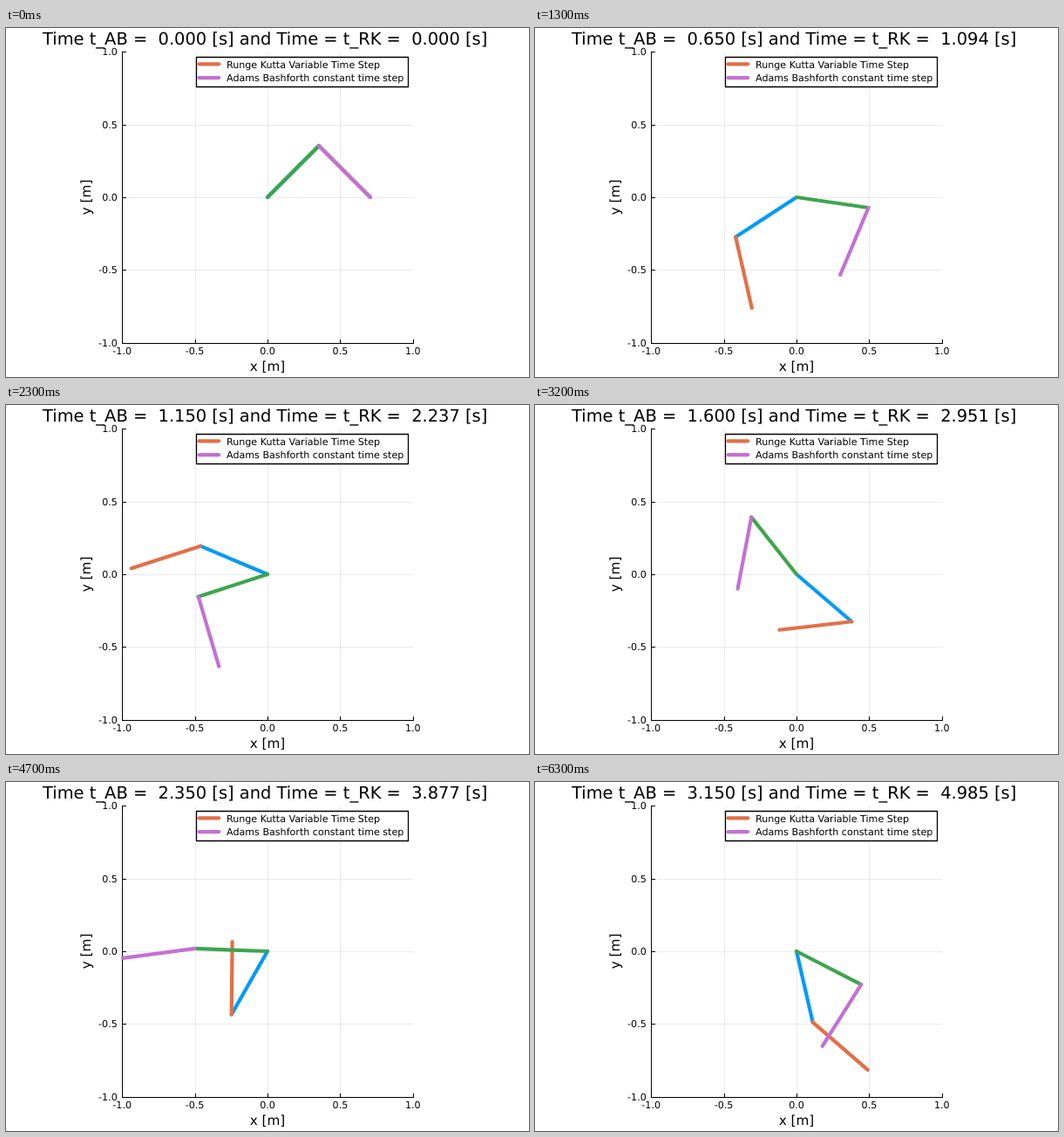
An HTML page for the animation above (6.4 s loop, 600x400 px).

```html
<!DOCTYPE html>
<html lang="en">
<head>
<meta charset="utf-8">
<title>Double pendulum</title>
<style>
  html, body { margin: 0; width: 100%; height: 100%; overflow: hidden; background: #fff; }
  svg { display: block; width: 600px; height: 400px; }
  text { font: 11.11px "DejaVu Sans", sans-serif; white-space: pre; text-rendering: geometricPrecision; }
  path, line { fill: none; stroke-linecap: round; }
  #title { font-size: 19.44px; }
  .label { font-size: 15.28px; text-anchor: middle; }
  .grid { stroke: #000; stroke-opacity: .08; stroke-linecap: butt; }
  .axis { stroke: #000; stroke-linecap: square; }
  .rod { stroke-width: 4.2; }
</style>
</head>
<body>
<svg viewBox="0 0 600 400">
  <g id="plot"></g>
  <text class="label" x="300" y="392.6">x [m]</text>
  <text class="label" transform="translate(97 194) rotate(-90)">y [m]</text>
  <text id="title" x="42" y="19.2"></text>
  <g id="rods"></g>
  <rect x="218.5" y="33.5" width="243" height="34" fill="#fff" stroke="#000" stroke-width="1.3" stroke-linejoin="round"/>
  <path class="rod" d="M221.5 41.3H244.2" stroke="#e36f47"/>
  <path class="rod" d="M221.5 57.1H244.2" stroke="#c371d2"/>
  <text x="253" y="45.5">Runge Kutta Variable Time Step</text>
  <text x="253" y="61.1">Adams Bashforth constant time step</text>
</svg>
<script>
const STEP = 100, COUNT = 64;
const CX = 300, CY = 194, UNIT = 166.8, LEN = UNIT / 2;

// key poses of the swing: time, upper and lower angle in degrees from straight down
const SWING = [
  [0, 135, 45], [.65, 81.7, -22.8], [1.094, -56.9, 12.9], [1.15, -72.1, 16.5],
  [1.6, -141.6, -10.8], [2, -138.2, -54.5], [2.237, -112.8, -72.2], [2.7, -7.1, -104.8],
  [2.951, 49.4, -83.5], [3.15, 62.8, -32.2], [3.455, 10, 47.4], [4.322, -47.1, 305.1],
  [4.68, -56, 366], [4.985, 12.9, 409.1]
];

// step index and time reached by the variable-step solver
const CLOCK = [[0, 0], [7, .69], [13, 1.094], [23, 2.237], [32, 2.951], [40, 3.455], [54, 4.322], [63, 4.985]];

// smooth curve through column col of the keys, leaving the first key at rate0
function curve(keys, col, rate0) {
  const chord = i => (keys[i + 1][col] - keys[i][col]) / (keys[i + 1][0] - keys[i][0]);
  const last = keys.length - 1;
  const rate = keys.map((key, i) => {
    if (i === 0) return rate0;
    if (i === last) return chord(i - 1);
    const before = key[0] - keys[i - 1][0], after = keys[i + 1][0] - key[0];
    return (before * chord(i) + after * chord(i - 1)) / (before + after);
  });
  return t => {
    let i = 0;
    while (i < last - 1 && t > keys[i + 1][0]) i++;
    const a = keys[i], b = keys[i + 1], h = b[0] - a[0], u = (t - a[0]) / h, v = 1 - u;
    const s = u * u * (3 - 2 * u);
    return a[col] * (1 - s) + b[col] * s + h * u * v * (v * rate[i] - u * rate[i + 1]);
  };
}

const upperAngle = curve(SWING, 1, 0);
const lowerAngle = curve(SWING, 2, 0);
const solverTime = curve(CLOCK, 1, .1);

function add(parent, tag, attrs, text) {
  const el = document.createElementNS(parent.namespaceURI, tag);
  for (const k in attrs) el.setAttribute(k, attrs[k]);
  if (text) el.textContent = text;
  return parent.appendChild(el);
}

const plot = document.getElementById("plot");
const rods = document.getElementById("rods");
const title = document.getElementById("title");

// centres of whole pixels keep the grid crisp
const px = v => Math.round(CX + v * UNIT) + .5;
const py = v => Math.round(CY - v * UNIT) + .5;
const left = px(-1), right = px(1), ceiling = py(1), floor = py(-1);

for (const v of [-.5, 0, .5]) {
  add(plot, "path", { class: "grid", d: `M${px(v)} ${ceiling}V${floor}M${left} ${py(v)}H${right}` });
}
add(plot, "path", { class: "axis", d: `M${left} ${ceiling}V${floor}H${right}` });
for (const v of [-1, -.5, 0, .5, 1]) {
  const x = px(v), y = py(v), name = v.toFixed(1);
  add(plot, "path", { class: "axis", d: `M${x} ${floor}v-4M${left} ${y}h4` });
  add(plot, "text", { x: CX + v * UNIT, y: 374, "text-anchor": "middle" }, name);
  add(plot, "text", { x: 127.8, y: y + 3.5, "text-anchor": "end" }, name);
}

const [rk1, rk2, ab1, ab2] = ["#009afa", "#e36f47", "#3ea44e", "#c371d2"]
  .map(stroke => add(rods, "line", { class: "rod", stroke }));

function place(line, x1, y1, deg) {
  const r = deg * Math.PI / 180;
  const x2 = x1 + LEN * Math.sin(r), y2 = y1 + LEN * Math.cos(r);
  for (const [k, v] of Object.entries({ x1, y1, x2, y2 })) line.setAttribute(k, v);
  return [x2, y2];
}

function pose(upper, lower, t) {
  const [x, y] = place(upper, CX, CY, upperAngle(t));
  place(lower, x, y, lowerAngle(t));
}

function draw(n) {
  const ab = n * .05, rk = solverTime(n);
  pose(rk1, rk2, rk);
  pose(ab1, ab2, ab);
  title.textContent = `Time t_AB =\u00a0 ${ab.toFixed(3)} [s] and Time = t_RK =\u00a0 ${rk.toFixed(3)} [s]`;
}

const start = performance.now();
let shown = -1;
function tick() {
  const n = Math.floor((performance.now() - start) / STEP) % COUNT;
  if (n !== shown) draw(shown = n);
  requestAnimationFrame(tick);
}
tick();
</script>
</body>
</html>
```
